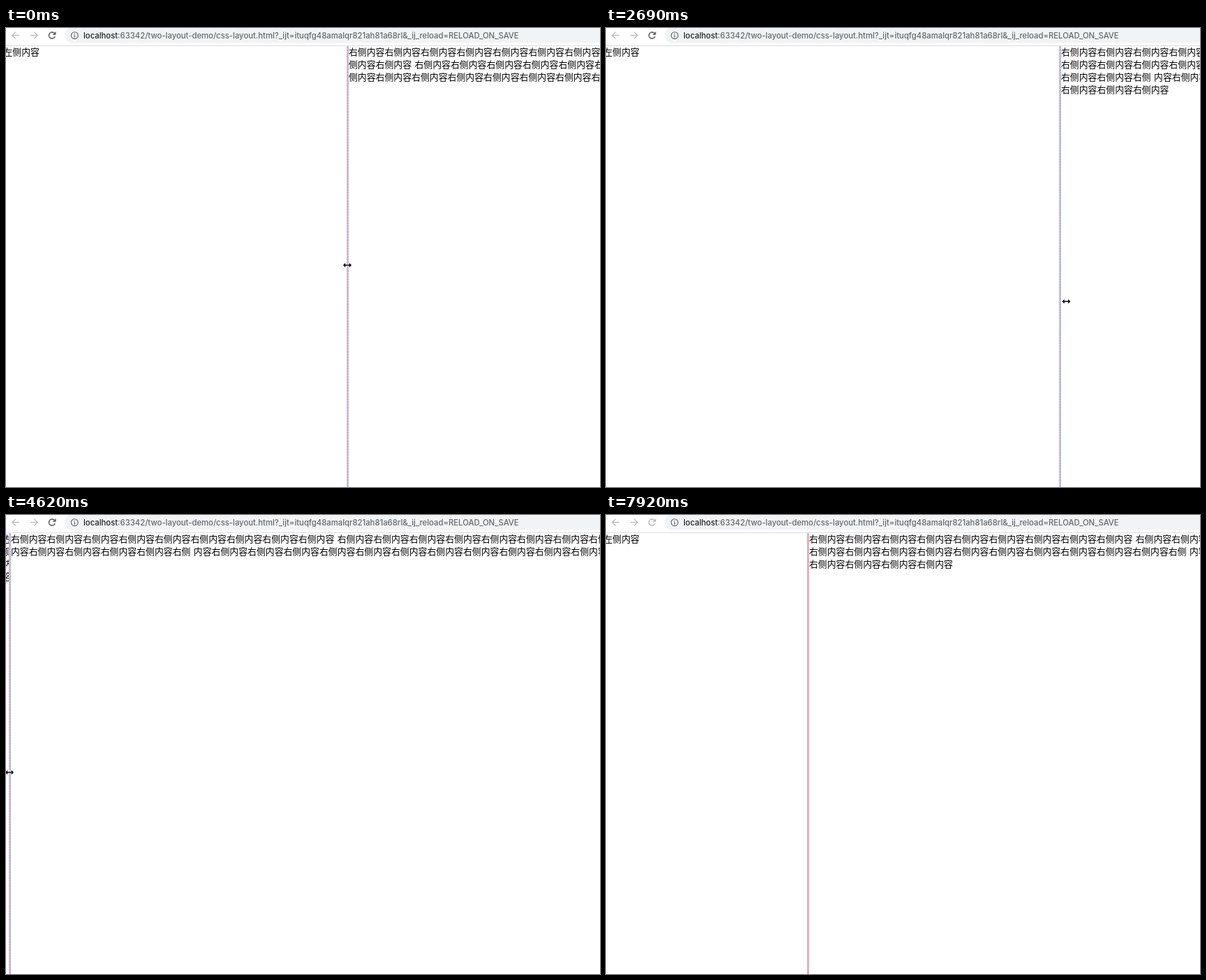
Animation of 851 by 658 pixels, one loop 8.02 s. Source, as an HTML page with a canvas:

```html
<!DOCTYPE html>
<html lang="zh-CN">
<head>
<meta charset="utf-8">
<title>Two column layout</title>
<style>
html, body { margin: 0; width: 100%; height: 100%; overflow: hidden; background: #fff; }
canvas { display: block; width: 851px; height: 658px; }
</style>
</head>
<body>
<canvas id="stage" width="851" height="658"></canvas>
<script>
const ctx = document.getElementById('stage').getContext('2d');
const W = 851, H = 658, LOOP = 8020, STEP = 149.2;
const EM = 12.87, SPACE = 4.4, LINE = 18.2, BASE = 38.8;
const PAGE_LEFT = -3.5, PAGE_RIGHT = 1438;
const URL_FONT = '500 11.3px Inter, sans-serif';
const CJK_FONT = '500 ' + EM + 'px "Noto Sans CJK SC", "Noto Sans CJK", sans-serif';

// Turning points of the drag: step, right column edge, pointer height
const drag = [
  [1, 491, 340], [5, 284, 342], [10, 540, 358], [14, 204, 374], [18.7, 677, 393],
  [23, 331, 386], [24, 331, 386], [29, 7, 369], [31, 7, 369], [37.8, 475, 369],
  [41, 463, 361], [45, 291, 347]
];
// Pointer leaving towards the lower right corner
const exit = [[45, 289, 347], [48, 741, 616], [49, 741, 616], [50, 802, 649]];

const rightText = '右侧内容'.repeat(48);
const spacesAt = [36, 80, 130];

// Cosine easing from one key to the next
function along(keys, k) {
  const i = keys.findIndex(key => key[0] >= k);
  if (i <= 0) return keys.at(i).slice(1);
  const [k0, ...a] = keys[i - 1], [k1, ...b] = keys[i];
  const e = (1 - Math.cos(Math.PI * (k - k0) / (k1 - k0))) / 2;
  return a.map((v, n) => Math.round(v + (b[n] - v) * e));
}

const splitAt = k => along(drag, k)[0];

function line(points, color, width) {
  ctx.strokeStyle = color;
  ctx.lineWidth = width;
  ctx.beginPath();
  points.forEach(([x, y]) => ctx.lineTo(x, y));
  ctx.stroke();
}

function polygon(points, x, y) {
  ctx.beginPath();
  points.forEach(([px, py]) => ctx.lineTo(x + px, y + py));
  ctx.closePath();
  ctx.lineJoin = 'round';
  ctx.strokeStyle = '#fff';
  ctx.lineWidth = 1.6;
  ctx.stroke();
  ctx.fillStyle = '#000';
  ctx.fill();
  ctx.lineJoin = 'miter';
}

function navArrow(x, dir) {
  const y = 10.5, tip = x + 5 * dir;
  line([[x - 5 * dir, y], [tip, y]], '#babcbe', 1.4);
  line([[tip - 4.6 * dir, y - 4.8], [tip, y], [tip - 4.6 * dir, y + 4.8]], '#babcbe', 1.4);
}

function reload(color) {
  ctx.strokeStyle = color;
  ctx.lineWidth = 1.5;
  ctx.beginPath();
  ctx.arc(66, 10.5, 4.5, 0.35, 5.5);
  ctx.stroke();
  ctx.fillStyle = color;
  ctx.beginPath();
  ctx.moveTo(71.5, 5);
  ctx.lineTo(71.5, 9.8);
  ctx.lineTo(66.7, 9.8);
  ctx.fill();
}

function toolbar(dim) {
  ctx.fillStyle = '#f1f3f4';
  ctx.beginPath();
  ctx.roundRect(84, -1, 820, 22.6, 11.3);
  ctx.fill();
  ctx.fillStyle = '#dcdde0';
  ctx.fillRect(0, 25, W, 1);
  navArrow(14, -1);
  navArrow(40, 1);
  reload(dim ? '#b4b6b9' : '#55585c');

  ctx.strokeStyle = ctx.fillStyle = '#5f6368';
  ctx.lineWidth = 1.1;
  ctx.beginPath();
  ctx.arc(98.3, 10.7, 4.9, 0, 7);
  ctx.stroke();
  ctx.fillRect(97.7, 10, 1.2, 3.5);
  ctx.fillRect(97.7, 7.8, 1.2, 1.3);

  const host = 'localhost';
  ctx.font = URL_FONT;
  ctx.fillStyle = '#202124';
  ctx.fillText(host, 111, 14.6);
  const x = 111 + ctx.measureText(host).width;
  ctx.fillStyle = '#65696d';
  ctx.fillText(':63342/two-layout-demo/css-layout.html?_ijt=ituqfg48amalqr821ah81a68rl&_ij_reload=RELOAD_ON_SAVE', x, 14.6);
}

function wrap(text, left, right, gaps) {
  let x = left, y = BASE;
  for (let i = 0; i < text.length; i++) {
    if (gaps.includes(i)) x += SPACE;
    if (x > left && x + EM > right) {
      x = left;
      y += LINE;
    }
    if (x < W) ctx.fillText(text[i], x, y);
    x += EM;
  }
}

function columns(x) {
  ctx.font = CJK_FONT;
  ctx.fillStyle = '#000';
  ctx.save();
  ctx.beginPath();
  ctx.rect(0, 26, Math.max(0, x - 3), H);
  ctx.clip();
  wrap('左侧内容', PAGE_LEFT, x - 3, []);
  ctx.restore();
  wrap(rightText, x, PAGE_RIGHT, spacesAt);
}

function divider(x, active) {
  const left = x - 3;
  ctx.fillStyle = active ? '#efb5c6' : '#e3b0b8';
  ctx.fillRect(left, 26, 3, H);
  if (!active) return;
  ctx.fillStyle = '#8cc8e6';
  for (let y = 27; y < H; y += 4) ctx.fillRect(left + 1, y, 2, 2.4);
}

function resizePointer(x, y) {
  polygon([
    [-6, 0], [-2.8, -3.2], [-2.8, -0.8], [2.8, -0.8], [2.8, -3.2],
    [6, 0], [2.8, 3.2], [2.8, 0.8], [-2.8, 0.8], [-2.8, 3.2]
  ], x, y);
}

function arrowPointer(x, y) {
  polygon([[0, 0], [0, 12], [2.8, 9.5], [4.6, 13.6], [6.5, 12.8], [4.7, 8.8], [8.4, 8.6]], x, y);
}

// While dragging, the pointer runs ahead of the divider
function pointer(k, dragging) {
  if (dragging) {
    const [x, y] = along(drag, k);
    const lead = x !== splitAt(k - 1) ? (splitAt(k + 1) - x) * 0.45 : 0;
    resizePointer(x - 2 + lead, y);
  } else if (k <= 50) {
    arrowPointer(...along(exit, k));
  }
}

function draw(t) {
  const k = Math.floor((t + 6) / STEP);
  const x = splitAt(k), dragging = k < 47;
  ctx.fillStyle = '#fff';
  ctx.fillRect(0, 0, W, H);
  toolbar(t >= 7920);
  columns(x);
  divider(x, dragging);
  pointer(k, dragging);
}

const start = performance.now();
function tick() {
  draw((performance.now() - start) % LOOP);
  requestAnimationFrame(tick);
}
tick();
</script>
</body>
</html>
```
